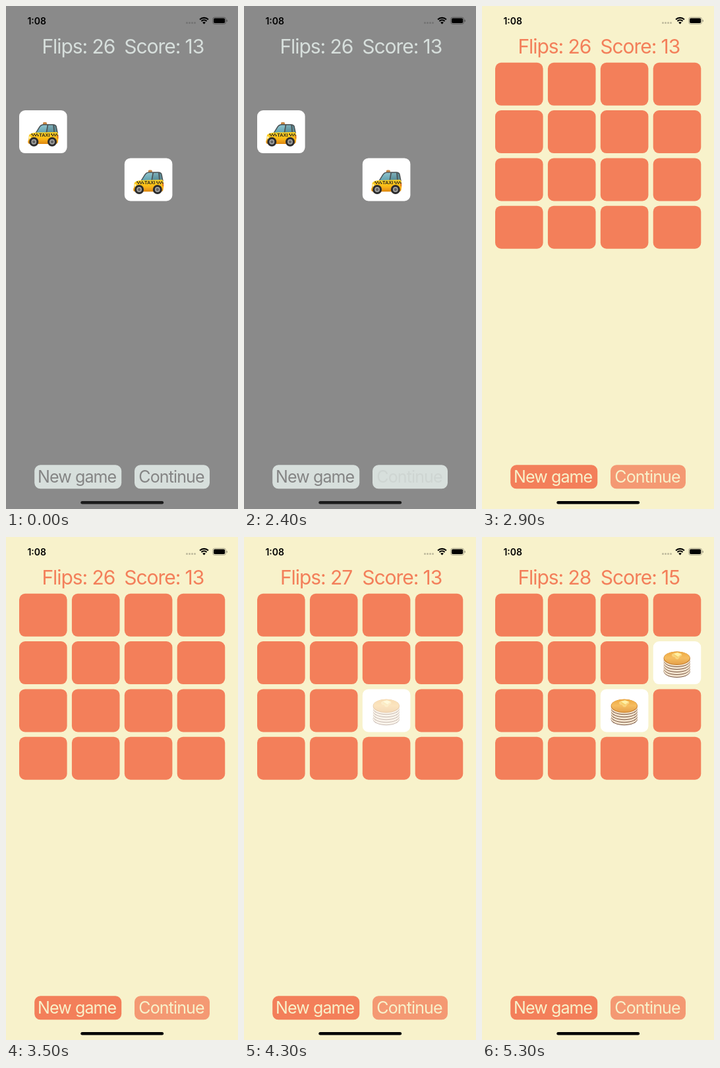
Recreate the animation shown at these times as an HTML page with a canvas. Size 352 by 762 pixels, loop 5.4 s.

```html
<!DOCTYPE html>
<html lang="en">
<head>
<meta charset="utf-8">
<title>Card matching game</title>
<style>
  html, body { margin: 0; width: 100%; height: 100%; overflow: hidden; background: #8a8a8a; }
  canvas { display: block; width: 352px; height: 762px; }
</style>
</head>
<body>
<canvas id="stage"></canvas>
<script>
const W = 352, H = 762, LOOP = 5400, STEP = 100;
const DEAL = 2500, FIRST_FLIP = 4200, SECOND_FLIP = 5000, FADE = 250;
const COL = 79.9, ROW = 72.3, CARD_W = 72.6, CARD_H = 65;
const UI = 'Inter, Roboto, sans-serif';
const canvas = document.getElementById('stage');
const ctx = canvas.getContext('2d');
const scale = window.devicePixelRatio || 1;
canvas.width = W * scale;
canvas.height = H * scale;

const dusk = { bg: '#8a8a8a', ink: '#d7dfdc', button: '#d7dfdc', soft: '#d7dfdc',
  label: '#848484', bar: '#1b1b1b', dots: '#737373', rim: '#555' };
const cream = { bg: '#f8f2cb', ink: '#f37f5a', button: '#f37f5a', soft: '#f49973',
  label: '#f8f2cb', bar: '#000', dots: '#bdb99c', rim: '#a19d85' };

const clamp = v => Math.max(0, Math.min(1, v));

function box(x, y, w, h, r, color) {
  ctx.fillStyle = color;
  ctx.beginPath();
  ctx.roundRect(x, y, w, h, r);
  ctx.fill();
}

function oval(x, y, rx, ry, color) {
  ctx.fillStyle = color;
  ctx.beginPath();
  ctx.ellipse(x, y, rx, ry, 0, 0, Math.PI * 2);
  ctx.fill();
}

function shape(path, color) {
  ctx.fillStyle = color;
  ctx.fill(new Path2D(path));
}

// Centres the visible glyphs on x, leaving side bearings out.
function text(str, x, y, font, color, tracking = 0) {
  ctx.font = font;
  ctx.letterSpacing = tracking + 'px';
  ctx.fillStyle = color;
  const m = ctx.measureText(str);
  ctx.fillText(str, x - (m.actualBoundingBoxRight - m.actualBoundingBoxLeft) / 2, y);
}

function label(str, x, y, size, color) {
  text(str, x, y, size + 'px ' + UI, color, size * -0.035);
}

function shade(y0, y1, ...colors) {
  const g = ctx.createLinearGradient(0, y0, 0, y1);
  colors.forEach((c, i) => g.addColorStop(i / (colors.length - 1), c));
  return g;
}

function statusBar(theme) {
  text('1:08', 46.7, 27.6, '600 14px ' + UI, '#000');
  for (let i = 0; i < 4; i++) oval(274.5 + i * 4, 25.6, 1.5, 1.5, theme.dots);

  ctx.strokeStyle = '#000';
  ctx.lineWidth = 2.1;
  for (const r of [9.1, 5.7]) {
    ctx.beginPath();
    ctx.arc(300.5, 27, r, -Math.PI * 0.75, -Math.PI * 0.25);
    ctx.stroke();
  }
  shape('M300.5 27.4 L298.1 25 Q300.5 22.9 302.9 25 Z', '#000');

  ctx.strokeStyle = theme.rim;
  ctx.lineWidth = 0.9;
  ctx.beginPath();
  ctx.roundRect(313.6, 17.2, 20, 10.2, 3);
  ctx.stroke();
  box(315, 18.6, 17.2, 7.4, 1.8, '#000');
  box(334.6, 20.7, 1.3, 3.4, 0.8, theme.rim);
}

// Pictures are drawn relative to the top-left corner of their card.
function taxi() {
  box(36, 18, 6, 4, 1.5, '#c98745');
  shape('M24 35 L30.5 24.5 Q32.5 21.3 36 21 L51 20.8 Q56 20.8 56.9 24.5 L59 35 Z', '#4a5052');
  shape('M26 34.3 L32 25 Q33.5 22.5 37 22.4 L42.5 22.3 L40.5 34 Z',
    shade(22, 35, '#8fc3cc', '#5d9fae'));
  shape('M44.2 22.5 L51.3 22.4 L52.3 33.5 L42.2 33.8 Z', shade(22, 35, '#7fb0ba', '#4f8793'));
  shape('M53 22.7 Q55 22.9 55.5 25 L57.2 33.5 L54 33.5 Z', '#5e8d97');

  shape('M14 47 L14.8 38 Q16 34.5 25 33.6 L57 32.9 Q59.5 33.5 59.5 43 L58.5 49 L15 50 Z',
    shade(32, 50, '#ffd927', '#fbc018', '#ee9f12'));
  for (let i = 0; i < 11; i++) {
    if (i > 2 && i < 8) continue;
    for (let row = 0; row < 2; row++) {
      box(18.5 + i * 3.7 + row * 1.8, 35.2 + row * 2, 1.9, 2, 0, '#302a1d');
    }
  }
  text('TAXI', 38.3, 39.8, 'bold 7.4px "Liberation Sans", sans-serif', '#302a1d');
  box(13.3, 44.2, 45, 6.6, 3, shade(44, 52, '#f8b01b', '#d9800d'));
  oval(16.3, 41.3, 1.6, 2.1, '#fff0a9');
  box(57.6, 38, 1.7, 5, 0.8, '#dc6d24');
  for (const x of [22.3, 50]) {
    oval(x, 47.6, 7, 7, '#2b2b2c');
    oval(x, 47.6, 3.9, 4, '#a3a4a3');
    oval(x, 47.6, 2.2, 2.3, '#626364');
  }
}

function pancakes() {
  oval(36, 45, 20.2, 8.7, '#8c6a50');
  for (let i = 4; i >= 0; i--) {
    const y = 28 + i * 4;
    oval(36, y + 1.5, 20, 9.4, '#76523c');
    oval(36, y + 0.4, 20.2, 9.4, '#f3e4cf');
  }
  oval(36, 25.6, 20.2, 10.2, '#c8812e');
  oval(36, 25, 19.4, 9.7, shade(15, 35, '#eda83f', '#f6bd60', '#e5a14b'));
  shape('M28 20 Q32 16 38 18 L43 19 Q45 22 41 23 L38 27 Q34 28 33 24 Q28 24 28 20 Z', '#f9d37d');
  shape('M31 19 L37 16.8 L43 19.2 L37.5 23.2 Z', '#fff0a5');
  shape('M31 19 L37.5 23.2 L37.5 25 L31.4 21 Z', '#f5ce65');
}

function card(col, row, color, picture, shown = 1) {
  ctx.save();
  ctx.translate(20 + col * COL, 85.8 + row * ROW);
  box(0, 0, CARD_W, CARD_H, 9, color);
  if (picture) {
    picture();
    // A white veil fades the picture in as one piece.
    ctx.globalAlpha = 1 - shown;
    box(8, 8, CARD_W - 16, CARD_H - 16, 0, color);
  }
  ctx.restore();
}

function continueAlpha(t) {
  if (t < 2300) return 1;
  if (t < DEAL) return 0.1;
  return clamp(0.48 + (t - DEAL) / 500);
}

function board(t) {
  const flips = { '2,2': FIRST_FLIP, '3,1': SECOND_FLIP };
  for (let row = 0; row < 4; row++) {
    for (let col = 0; col < 4; col++) {
      const start = flips[col + ',' + row];
      if (t >= start) card(col, row, '#fff', pancakes, clamp((t - start) / FADE));
      else card(col, row, cream.button);
    }
  }
}

function buttons(theme, t) {
  box(43.2, 695.3, 132, 36, 9, theme.button);
  label('New game', 108.8, 722.3, 25, theme.label);
  box(195, 695.3, 114, 36, 9, theme.soft);
  ctx.globalAlpha = continueAlpha(t);
  label('Continue', 251.6, 722.3, 25, theme.label);
  ctx.globalAlpha = 1;
}

function draw(t) {
  const dealt = t >= DEAL;
  const theme = dealt ? cream : dusk;
  const flips = 26 + (t >= FIRST_FLIP) + (t >= SECOND_FLIP);
  const score = t >= SECOND_FLIP ? 15 : 13;

  ctx.setTransform(scale, 0, 0, scale, 0, 0);
  ctx.fillStyle = theme.bg;
  ctx.fillRect(0, 0, W, H);
  statusBar(theme);
  label('Flips: ' + flips, 110.6, 71.5, 30, theme.ink);
  label('Score: ' + score, 240, 71.5, 30, theme.ink);
  if (dealt) {
    board(t);
  } else {
    card(0, 1, '#fff', taxi);
    card(2, 2, '#fff', taxi);
  }
  buttons(theme, t);
  box(113.3, 750, 125.8, 4.5, 2.2, theme.bar);
}

const began = performance.now();
function tick() {
  const t = (performance.now() - began) % LOOP;
  draw(Math.floor(t / STEP) * STEP);
  requestAnimationFrame(tick);
}
tick();
</script>
</body>
</html>
```
